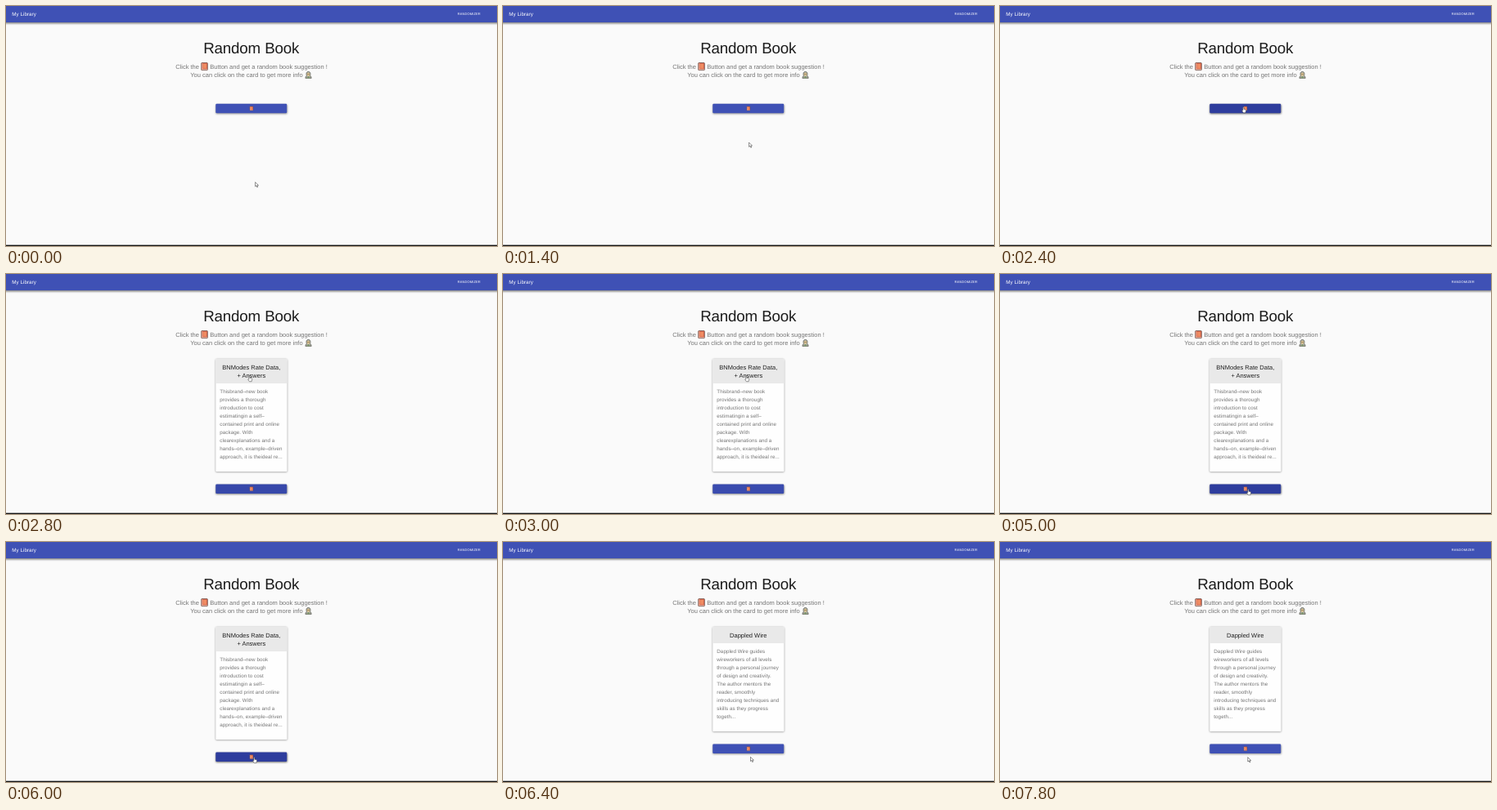
Recreate the animation shown at these times as an HTML page. Size 600 px wide and 294 px high, loop 8000 ms.

```html
<!DOCTYPE html>
<html lang="en">
<head>
<meta charset="utf-8">
<title>My Library</title>
<style>
html, body { margin: 0; width: 100%; height: 100%; overflow: hidden; background: #fafafa; }
svg { display: block; width: 100vw; height: 100vh; }
text { font-family: "Liberation Sans", Arial, sans-serif; text-rendering: geometricPrecision; }
.mid { text-anchor: middle; }
.lead { font-size: 7.5px; fill: #757575; }
.head { font-size: 7.5px; fill: #212121; text-anchor: middle; }
.body { font-size: 6.25px; letter-spacing: .047px; fill: #757575; }
</style>
</head>
<body>
<svg viewBox="0 0 600 294" xmlns="http://www.w3.org/2000/svg">
  <defs>
    <filter id="soft" x="-10%" y="-30%" width="120%" height="180%"><feGaussianBlur stdDeviation=".8"/></filter>
    <g id="book">
      <rect x=".4" y=".4" width="7.6" height="9" rx=".6" fill="#d9644a" stroke="#5b4a45" stroke-width=".7"/>
      <path d="M1.5 1v7.4M1 8.5h6.6" stroke="#f3d9c5" stroke-width=".7"/>
      <rect x="2.6" y="1.7" width="4.1" height="5.4" fill="#ef8c62"/>
    </g>
  </defs>
  <rect width="600" height="294" fill="#fafafa"/>
  <rect x="-4" y="2" width="608" height="19.5" fill="#000" opacity=".5" filter="url(#soft)"/>
  <rect width="600" height="20" fill="#3f51b5"/>
  <text x="7.3" y="12.2" font-size="6.25" letter-spacing=".047" fill="#fff">My Library</text>
  <text class="mid" x="565.8" y="11.1" font-size="4.06" letter-spacing=".08" fill="#fff">RANDOMIZER</text>
  <text class="mid" x="299.7" y="57.6" font-size="18.75" letter-spacing="-.156" fill="#1c1c1c">Random Book</text>
  <text class="lead" x="207.2" y="76.7">Click the</text>
  <use href="#book" x="238.3" y="69.2"/>
  <text class="lead" x="249.3" y="76.7">Button and get a random book suggestion !</text>
  <text class="lead" x="225.3" y="86.7">You can click on the card to get more info</text>
  <g transform="translate(365.3 80)">
    <path d="M.6 8.4Q.7 5.8 2 5.4Q.8.5 4.2.4Q7.600.5 6.400 5.4Q7.800 5.8 7.900 8.4Z" fill="#a7a99c" stroke="#55564f" stroke-width=".7"/>
    <circle cx="4.200" cy="3.700" r="1.900" fill="#e6c88f"/>
    <path d="M2.600 3.500h3.200" stroke="#5d5a50" stroke-width=".6"/>
    <path d="M2.200 8.300L4.200 6L6.200 8.300Z" fill="#7d9a67"/>
  </g>
  <g id="card"></g>
  <g id="button">
    <rect id="glow" x="256.3" y="1" width="87.4" height="11.4" rx="1.2" fill="#000" filter="url(#soft)"/>
    <rect id="face" x="256.25" width="87" height="11.4" rx="1.2"/>
    <use href="#book" transform="translate(297.7 3.1) scale(.53)"/>
  </g>
  <path id="arrow" d="M0 0V5.300L1.300 4.200L2.200 6.300L3.100 5.900L2.200 3.900H3.900Z" fill="#fff" stroke="#333" stroke-width=".55"/>
  <path id="hand" d="M1.400.7Q2 0 2.500.7V3L4.800 3.600Q5.400 3.900 5.200 4.900L4.600 7.500H1.900L.2 5Q.2 4.200 1.400 4.800Z" fill="#fff" stroke="#333" stroke-width=".5"/>
  <rect y="292.7" width="600" height="1.300" fill="#111"/>
</svg>
<script>
const LOOP = 8000, STEP = 200;
const $ = id => document.getElementById(id);

const books = [
  null,
  {
    head: ["BNModes Rate Data,", "+ Answers"],
    body: ["Thisbrand–new book", "provides a thorough", "introduction to cost", "estimatingin a self–",
      "contained print and online", "package. With", "clearexplanations and a",
      "hands–on, example–driven", "approach, it is theideal re..."]
  },
  {
    head: ["Dappled Wire"],
    body: ["Dappled Wire guides", "wireworkers of all levels", "through a personal journey", "of design and creativity.",
      "The author mentors the", "reader, smoothly", "introducing techniques and", "skills as they progress", "togeth..."]
  }
];

// time, x, y, pointer shape
const pointer = [
  [0, 304.6, 215.8, "arrow"], [200, 300.6, 215.5, "arrow"],
  [600, 313, 194, "arrow"], [800, 322, 172.4, "arrow"],
  [1400, 300.6, 167.2, "arrow"], [1600, 299.5, 148, "arrow"],
  [1800, 296.5, 125, "hand"], [2000, 295.4, 123.3, "hand"],
  [2600, 295.5, 124.2, "hand"],
  [3600, 238, 150, "arrow"], [3800, 191.4, 172.6, "arrow"],
  [4400, 222, 200, "arrow"], [4600, 266, 239, "arrow"],
  [4800, 298, 261, "hand"], [5000, 301.4, 263.2, "hand"],
  [6200, 302.5, 263.3, "arrow"], [7800, 302.8, 263.7, "arrow"]
];
// time, how far the button has turned to its hover colour
const hover = [[0, 0], [1800, .6], [2000, 1], [2600, .7], [2800, .45], [3000, .3], [3200, 0],
  [4800, .6], [5000, 1], [6200, .5], [6400, 0]];
const shown = [[0, 0], [2600, 1], [6200, 2]];

const at = (track, t) => track.filter(k => k[0] <= t).pop();
const mix = (a, b, k) => "rgb(" + a.map((v, i) => Math.round(v + (b[i] - v) * k)) + ")";
const lines = (list, cls, x, y) =>
  list.map((s, i) => `<text class="${cls}" x="${x}" y="${y + i * 10}">${s}</text>`).join("");

const headHeight = b => 10 + b.head.length * 10;
const cardHeight = b => headHeight(b) + b.body.length * 10 + 18;

function cardMarkup(b) {
  if (!b) return "";
  const box = (y, h, extra) => `<rect x="256.25" y="${y}" width="87.25" height="${h}" rx="1.2" ${extra}/>`;
  const h = headHeight(b), full = cardHeight(b);
  return box(104.6, full, 'fill="#000" opacity=".42" filter="url(#soft)"') +
    box(104, full, 'fill="#fefefe"') +
    box(104, h, 'fill="#e9e9e9"') +
    lines(b.head, "head", 299.8, 116.7) +
    lines(b.body, "body", 261.3, 104 + h + 12.2);
}

let current = -1;
function draw(ms) {
  const t = Math.floor(ms % LOOP / STEP) * STEP;
  const index = at(shown, t)[1], book = books[index];
  if (index !== current) {
    $("card").innerHTML = cardMarkup(book);
    current = index;
  }
  const top = book ? 104 + cardHeight(book) + 15.5 : 119.8;
  $("button").setAttribute("transform", `translate(0 ${top})`);
  const k = at(hover, t)[1];
  $("face").setAttribute("fill", mix([63, 81, 181], [46, 61, 157], k));
  $("glow").setAttribute("opacity", .4 + .15 * k);
  const [, x, y, shape] = at(pointer, t);
  for (const id of ["arrow", "hand"]) {
    $(id).setAttribute("visibility", id === shape ? "visible" : "hidden");
    $(id).setAttribute("transform", `translate(${x} ${y})`);
  }
}

const start = performance.now();
function tick() {
  draw(performance.now() - start);
  requestAnimationFrame(tick);
}
tick();
</script>
</body>
</html>
```
